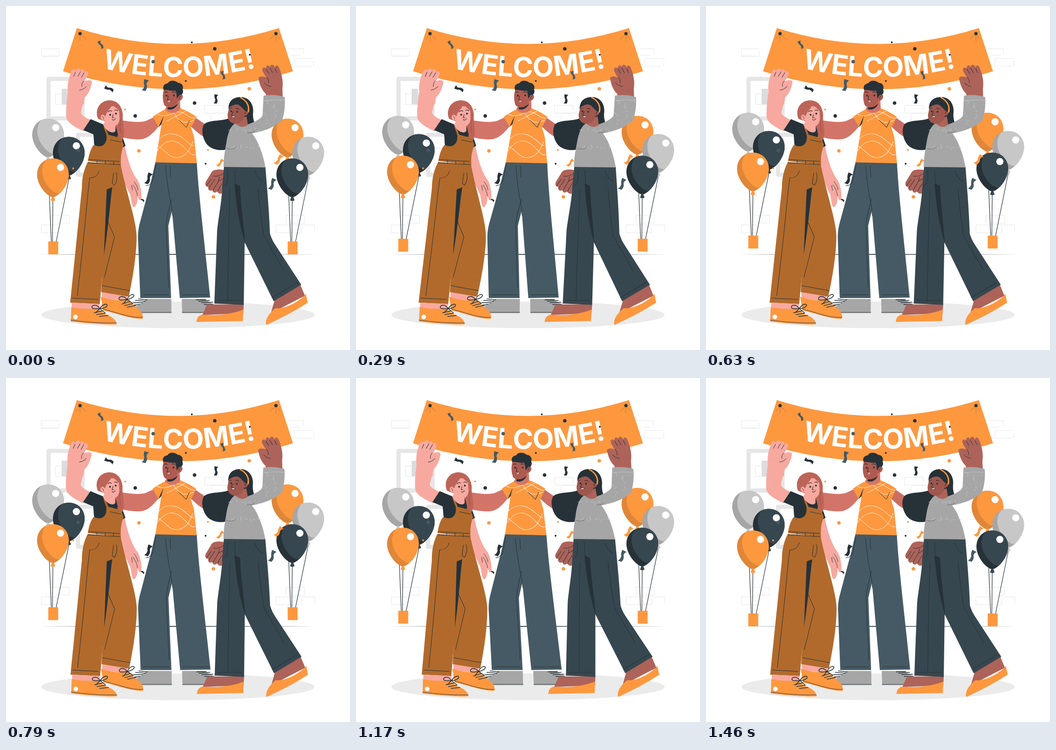
An HTML page with a canvas for the animation above (1.5 s loop, 748 by 748 pixels).

```html
<!DOCTYPE html>
<html lang="en">
<head>
<meta charset="utf-8">
<title>Welcome</title>
<style>
html, body { margin: 0; width: 100%; height: 100%; overflow: hidden; background: #fff; }
canvas { display: block; width: 100vw; height: 100vh; }
</style>
</head>
<body>
<canvas id="stage" width="748" height="748"></canvas>
<script>
const ctx = document.getElementById('stage').getContext('2d');
const LOOP = 1500, FRAMES = 36;
const C = {
  orange: '#fd983f', orangeShade: '#df8638', dark: '#263238', slate: '#37474f', blue: '#455a64',
  grey: '#a6a6a6', light: '#c7c7c7', wall: '#e6e6e6', brown: '#b16a2c',
  pink: '#f7a9a0', rose: '#d37468', tan: '#b05b50', umber: '#ad6359', auburn: '#bd6458', white: '#fff'
};

const cache = new Map();
function path(d) {
  if (!cache.has(d)) cache.set(d, new Path2D(d));
  return cache.get(d);
}
function fill(color, d) { ctx.fillStyle = color; ctx.fill(path(d)); }
function line(d, width = 1, color = C.dark) {
  ctx.strokeStyle = color;
  ctx.lineWidth = width;
  ctx.stroke(path(d));
}
function dot(x, y, r, color = C.dark) {
  ctx.fillStyle = color;
  ctx.beginPath();
  ctx.arc(x, y, r, 0, Math.PI * 2);
  ctx.fill();
}
function scoped(draw) { ctx.save(); draw(); ctx.restore(); }

function drawWall() {
  line('M116 93H77V109H112', 1, C.wall);
  line('M77 109H116V98M612 93H647V104M618 107H640M669 114H628V131H664M669 131V120', 1, C.wall);
  line('M432 233V216H472V226M446 233H486V250M446 250V236M432 233H480', 1, C.wall);
  line('M98 472V455H138V472H110M77 476H112M77 476V493H108M609 472V455H649V472H620', 1, C.wall);
  line('M671 476H587V493H643V480M671 476V490', 1, C.wall);
  line('M92.5 158.5H166.5V244.5H92.5Z', 9, C.wall);
  line('M108 191H146V214H108Z', 1, C.wall);
  fill('#dcdcdc', 'M121 180H135V192H146V214H121Z');
  line('M156.5 280H205V367H156.5Z', 9, C.wall);
  line('M164 309H190V343H164Z', 1, C.wall);
  ctx.fillStyle = '#ebebeb';
  ctx.beginPath();
  ctx.ellipse(374, 671.5, 297, 29, 0, 0, Math.PI * 2);
  ctx.fill();
  fill(C.dark, 'M69 540L374 539.2L679 540L374 540.9Z');
}

function drawBanner() {
  fill(C.orange, 'M154 48Q374 117 593.5 48L624 142Q374 220 124 142Z');
  line('M158 64L152 72M161 64V76M164 64Q171 68 174 73M590 64L596 72M587 64V76M584 64Q577 68 574 73', .6, '#a2662f');
  dot(161, 60, 3.6);
  dot(587, 60, 3.6);
  ctx.font = '700 60px Inter, sans-serif';
  ctx.textAlign = 'center';
  ctx.fillStyle = C.white;
  const letters = [...'WELCOME!'];
  const widths = letters.map(letter => ctx.measureText(letter).width);
  let x = 376 - widths.reduce((sum, w) => sum + w) / 2;
  letters.forEach((letter, i) => {
    const dx = x + widths[i] / 2 - 374;
    x += widths[i];
    scoped(() => {
      ctx.translate(374 + dx, 154.5 - .00072 * dx * dx);
      ctx.rotate(Math.atan(-.00144 * dx));
      ctx.fillText(letter, 0, 0);
    });
  });
}

function balloon(x, y, color, shade) {
  const body = 'M0-35C20-35 34.5-20 34.5 0C34.5 23 14 46 2 49H-2C-14 46-34.5 23-34.5 0C-34.5-20-20-35 0-35Z';
  scoped(() => {
    ctx.translate(x, y);
    fill(shade, body);
    fill(color, 'M-2 48H2L5 56Q0 59-5 56Z');
    scoped(() => {
      ctx.clip(path(body));
      ctx.translate(11, -8);
      fill(color, body);
    });
    dot(16.5, -15.5, 7.8, C.white);
  });
}

function drawBalloons(x, colors) {
  scoped(() => {
    ctx.translate(x, 0);
    line('M91 335L98.5 513M102 420L101 513M137 375L109 513', 1.2);
    balloon(91.5, 280, ...colors[0]);
    balloon(136.5, 319.5, ...colors[1]);
    balloon(102, 366.5, ...colors[2]);
    fill(C.orange, 'M92 512H113.5V540H92Z');
  });
}

function ribbon(x, y, size, angle, color) {
  scoped(() => {
    ctx.translate(x, y);
    ctx.rotate(angle);
    ctx.scale(size, size);
    fill(color, 'M-2-13L8-10C3-7 2-3 3 0C5 6 2 10 0 13L-8 11C-3 8-3 4-2 1C-4-4-3-9-2-13Z');
  });
}

function drawConfetti() {
  for (const [x, y] of [[404, 79], [530, 106], [391, 163], [434, 343]]) dot(x, y, 2);
  for (const [x, y] of [[454, 93], [410, 211], [281, 239]]) dot(x, y, 3.8);
  for (const [x, y] of [[320, 121], [157, 314]]) dot(x, y, 3.8, C.blue);
  for (const [x, y] of [[259, 225], [439, 313], [146, 353]]) dot(x, y, 2, C.orange);
  for (const [x, y] of [[529, 180], [289, 315], [451, 415]]) dot(x, y, 3.8, C.orange);
  ribbon(206, 84, .72, -.7, C.blue);
  ribbon(224, 180, .8, -1.35, C.dark);
  ribbon(303, 172, 1, 0, C.blue);
  ribbon(456.5, 202, .8, -.15, C.dark);
  ribbon(472, 150, .72, -.5, C.blue);
  ribbon(579, 387, 1, .15, C.blue);
  ribbon(593, 334, .95, .4, C.orange);
  ribbon(466, 341, .75, .5, C.orange);
  ribbon(310, 375, 1, .15, C.dark);
  ribbon(295, 421, .5, -1.2, C.dark);
}

function drawMan() {
  fill(C.rose, 'M244 247C270 252 290 254 304 250L330 238L343 250L331 263C317 280 305 290 290 290C275 290 262 288 250 285Z');
  fill('#cb6d61', 'M402 236L440 262V289C425 284 410 270 396 256Z');

  fill(C.grey, 'M306 637H359.5V668H273C270 660 280 654 290 650Z');
  fill(C.grey, 'M382 637H430L454 650Q460 664 454 668H383Z');
  line('M273 666H360M383 666H454', .8);
  line('M307 639L288 637M303 642L281 640M297 645L277 645M291 649L274 651', 1.5);
  line('M414 639L435 638M419 642L443 640M425 645L449 644M431 649L450 649', 1.5);

  fill(C.blue, 'M325 339L415 341C418 400 430 500 444 634L378 635L361 445Q356 465 353 478L359 635L292 635L287 502C287 490 289 478 292 468L316 378Z');
  line('M347 348Q350 390 360 436L362 456M357 348L358 372M360 420Q350 455 348 478L354 612');
  line('M298 628H354M384 628H440M326 345L319 381Q315 390 304 391');

  fill(C.orange, 'M346 225C338 229 327 235 319 241L332 263L338 257L325 340L415 342L409 285L401 259L404 262L414 241C402 232 390 227 379 222Z');
  scoped(() => {
    ctx.clip(path('M346 225L319 241L332 263L338 257L325 340L415 342L401 259L414 241L379 222Z'));
    line('M328 235C350 245 358 232 375 230C390 230 395 245 414 244M360 225C380 260 390 255 412 247M350 250C375 237 385 232 395 226', 1, '#fff0df');
    line('M326 298C345 270 370 275 388 290S405 306 412 300M326 302C350 314 355 334 377 329S402 300 412 285M327 318C348 285 370 290 386 306S405 327 414 322', 1, '#fff0df');
  });
  fill(C.dark, 'M332 263L343 238L338 257Z');
  line('M376 248L392 264L399 249');

  fill(C.rose, 'M346 225L352 212L378 200L379 222C374 235 356 236 346 225Z');
  fill(C.dark, 'M352 219C360 222 368 218 374 211C371 222 360 228 351 224Z');
  fill(C.tan, 'M344 180C340 190 340 204 344 215C348 222 361 222 368 216Q372 212 375 206C384 207 388 193 380 192L377 179Z');
  fill(C.dark, 'M343 183C339 174 345 169 352 168C356 160 369 162 374 167C382 167 387 174 384 181C387 188 383 192 381 194C376 191 375 198 372 201C370 194 372 189 368 184C360 186 351 181 343 183Z');
  dot(349, 195, 2);
  dot(365, 194.5, 2);
  line('M345 188Q348 185 351 188M361 188Q366 185 369 189M353 195L351 204L355 204', 1.2);
  fill(C.white, 'M351 207L358 206Q357 211 352 209Z');
  line('M351 207Q354 211 359 206M379 196Q376 199 377 202');
}

const HAND = 'M135 188C132 170 138 152 142 143C145 134 152 137 151 144C152 134 162 133 162 142C164 134 172 137 170 145C174 138 181 143 178 150L170 164C176 160 187 160 187 166C185 176 181 190 171 199L169 214H134Z';
const PALM_LINES = 'M151 144L147 153M162 143L156 153M170 145L164 155M169 163Q164 168 165 175M160 183Q170 181 175 175';

function bow(x, y, angle) {
  scoped(() => {
    ctx.translate(x, y);
    ctx.rotate(angle);
    line('M0 0C-8-12-19-7-17-2C-14 2-6 0 0 0C6-10 16-12 16-7C15-3 7 0 0 0L-9 9M0 0L11 9', 1.6);
    line('M-12 9L6 5M-7 13L12 10M-1 17L18 15', 1.5);
  });
}

function drawRedhead() {
  fill(C.pink, 'M246 315L258 302C265 338 275 365 286 378C292 388 296 407 294 420C291 426 288 420 286 412C287 425 283 436 278 438C272 434 273 420 270 410C260 390 249 368 246 345Z');
  line('M278 382Q285 389 287 400M276 389Q284 399 286 413M273 390L275 401', .9);

  fill(C.pink, 'M208 619L263 630V642L209 636Z');
  fill(C.orange, 'M206 632Q236 643 264 639L281 653C291 660 300 669 297 680C270 681 245 669 211 662Z');
  line('M211 659C244 667 270 679 297 677', .9);
  bow(263, 638, -.1);
  fill(C.brown, 'M218 395L249 343C260 400 284 468 284 501C284 540 276 590 267 632L207 622L213 510Z');
  line('M222 470L236 502L214 590M209 608L269 619');
  fill(C.brown, 'M178 339C170 354 165 372 165 396L139.5 645L204 648L215 515L223 403L240 394L250 345Z');
  fill(C.dark, 'M219 399L231 394C226 430 224 470 213 542Z');
  line('M144 635L200 638M182 374L178 408Q169 510 155 630M182 374Q199 374 203 358M240 362Q244 378 236 390L231 386L234 363');

  fill(C.pink, 'M143 645L203 648V660H143Z');
  fill(C.orange, 'M142 655Q170 660 200 658L214 669C227 674 239 680 241 692C218 694 168 689 141 686Z');
  line('M141 683C170 687 205 690 240 689', .9);
  dot(151, 676, 5, C.white);
  bow(204, 658, 0);

  fill(C.pink, 'M135 184C132 206 130 226 131 242C133 255 157 267 169 272L186 249C174 243 163 238 163 231C165 222 169 209 171 194Z');
  fill(C.pink, HAND);
  line(PALM_LINES);

  fill(C.dark, 'M184 246L168 270L190 279C192 296 190 304 196 306L245 312L260 304L249 272L238 261L213 258Z');
  fill(C.brown, 'M216 263L223 280L242 285L245 272L248 274L251 289L256 302C250 318 249 330 250 346L178 337C181 320 185 309 191 302C209 311 222 299 218 279L212 263Z');
  line('M180 334L247 338M178 341L248 345M198 335V342M216 337V344M234 338V345M227 291L250 296', 1);

  fill(C.auburn, 'M200 245C192 224 205 206 224 205C242 205 252 217 254 236C252 255 262 275 253 292L246 286C241 276 242 266 236 258L207 248Z');
  fill(C.pink, 'M216 250L238 253L238 272C231 280 216 270 211 258Z');
  fill(C.pink, 'M213 226C224 215 239 215 246 227L247 245C246 259 237 263 229 262C220 260 216 254 215 249C207 251 201 238 211 236Z');
  fill(C.auburn, 'M200 239C200 219 212 208 225 207C237 207 246 217 248 229C240 224 236 216 230 216C226 225 219 228 216 240L210 235Q204 234 206 246Z');
  line('M249 247Q246 260 250 276', .7, '#94473f');
  dot(226.5, 236.5, 2);
  dot(239, 234, 2);
  line('M222 230Q226 226 230 229M236 227Q240 225 243 228M233 236L231 243L235 243M231 247Q235 250 238 245', 1.2);
  line('M209 240Q214 242 212 246', .9);
}

function drawSweaterFlecks() {
  for (let i = 0; i < 34; i++) {
    const low = i < 22;
    const x = low ? 484 + (i * 29 % 68) : 563 + (i * 17 % 35);
    const y = low ? 270 + (i * 37 % 74) : 204 + (i * 23 % 52);
    const a = i * 2.4;
    line(`M${x} ${y}l${(Math.cos(a) * 5).toFixed(1)} ${(Math.sin(a) * 5).toFixed(1)}`, .9, C.light);
  }
}

function drawBrunette() {
  fill(C.umber, 'M476 357C463 354 449 355 446 363L434 383C432 390 436 394 440 393C438 400 444 404 449 400C449 407 456 407 459 403C463 411 472 409 474 402Z');
  line('M446 377L436 391M454 377L441 396M462 381L450 401M470 386Q464 395 460 403M451 370Q464 372 474 363M464 372L462 381L474 374', 1);

  fill(C.umber, 'M437 649H517L516 668L427 672Z');
  fill(C.orange, 'M414 687Q415 674 426 671C450 674 490 671 516 660L515 685Z');
  fill(C.umber, 'M584 640L640 606L650 630L576 668Z');
  fill(C.orange, 'M565 692C564 679 574 666 586 657C606 660 639 642 652 626L656 645C632 661 596 680 567 693Z');

  fill(C.slate, 'M496 375L510 349H564C567 390 572 440 574 495Q578 508 584 517L642 606L582 642L518 512Z');
  fill(C.slate, 'M474 349H552L510 393L519 510L517 650L453 647L459 490C461 465 470 420 470 395Z');
  fill(C.dark, 'M497 386L509 391C510 430 517 475 520 516C507 475 500 430 497 386Z');
  line('M482 357V380Q480 390 473 391M487 400Q483 530 482 640M459 640H512M578 634L634 601M497 357L499 390M541 358Q548 378 559 381M548 400Q555 470 561 500L604 575', 1);

  fill(C.dark, 'M484 224C483 205 496 197 513 198C531 200 540 217 537 235Q537 247 541 256L520 262L498 300C487 316 456 318 440 304C428 293 423 268 431 257C443 246 472 252 489 242Z');
  scoped(() => {
    ctx.translate(736, -8);
    ctx.scale(-1, 1);
    fill(C.umber, HAND);
    line(PALM_LINES);
  });
  fill(C.grey, 'M499 255C508 263 520 262 527 257C544 251 558 243 558 236L560 195Q583 191 606 198C608 218 604 240 600 249C585 263 562 272 535 277C548 292 560 325 564 351L473 350C473 331 476 315 479 298C482 279 487 261 499 255Z');
  drawSweaterFlecks();
  line('M562 206Q583 203 605 205', .9, C.light);
  line('M480 310Q494 314 501 306M525 276L536 275L543 270', .9, '#676767');

  fill(C.umber, 'M503 247L523 240L526 258C517 266 506 263 499 255Z');
  fill('#9f574e', 'M485 221C492 211 508 211 518 222C525 218 531 226 525 236C521 239 519 238 518 240C517 252 505 257 496 256C485 253 481 244 482 236Z');
  fill(C.dark, 'M484 222C485 206 501 199 512 200C522 206 527 219 525 230C516 228 512 216 503 214Q492 214 484 222Z');
  line('M510 199C522 205 530 216 527 230', 3, C.orange);
  dot(490, 229, 1.9);
  dot(502.5, 230, 1.9);
  line('M486 223L491 222M500 223Q504 221 507 225M494 230L490 237L494 238', 1.2);
  fill(C.white, 'M491 240L498 240Q496 244 492 242Z');
  line('M490 240Q495 245 499 240M523 229Q518 231 521 235');
}

function render(ms) {
  const frame = Math.min(FRAMES - 1, Math.floor((ms + 5) * FRAMES / LOOP));
  const phase = frame / (FRAMES - 1);
  const lift = 14.8 * (1 - Math.abs(2 * phase - 1));
  const sway = Math.asin(Math.sin(phase * 2 * Math.PI)) * 2 / Math.PI;
  const skew = -Math.tan(Math.PI / 180) * sway;

  ctx.fillStyle = C.white;
  ctx.fillRect(0, 0, 748, 748);
  ctx.lineCap = ctx.lineJoin = 'round';
  drawWall();
  drawBanner();
  scoped(() => {
    const orange = [C.orange, C.orangeShade], grey = [C.light, C.grey], dark = [C.slate, C.dark];
    ctx.translate(0, -lift);
    drawBalloons(0, [grey, dark, orange]);
    drawBalloons(520.5, [orange, grey, dark]);
  });
  drawConfetti();
  scoped(() => {
    ctx.transform(1, 0, skew, 1, -skew * 400, 0);
    drawMan();
    drawRedhead();
    drawBrunette();
  });
}

function tick() {
  render(performance.now() % LOOP);
  requestAnimationFrame(tick);
}
tick();
</script>
</body>
</html>
```
